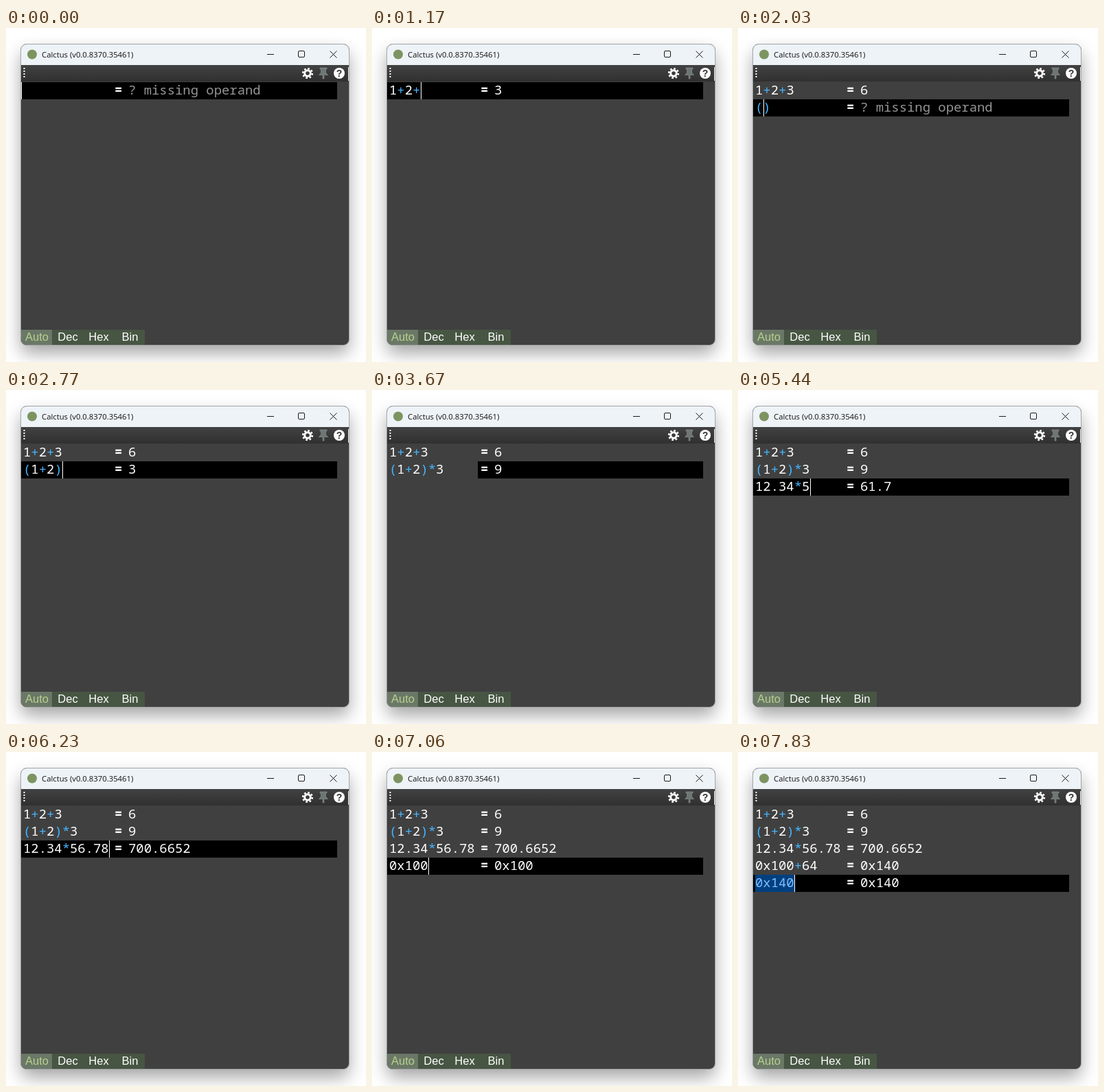
An HTML page that plays this animation: 524 px wide and 487 px high, repeating every 8 s.

```html
<!DOCTYPE html>
<html lang="en">
<head>
<meta charset="utf-8">
<title>Calctus</title>
<style>
  html, body { margin: 0; width: 100%; height: 100%; overflow: hidden; background: #fff; }
  svg { display: block; }
  text { white-space: pre; }
  .mono { font: 18.9px "Noto Sans Mono", monospace; fill: #fff; }
  .title { font: 11.3px "Open Sans", "Noto Sans", sans-serif; fill: #111; }
  .tab { font: 16.5px "Liberation Sans", sans-serif; fill: #fff; text-anchor: middle; }
  .op { fill: #45b4ff; }
  .err { fill: #959595; }
  .eq { font-weight: 700; }
</style>
</head>
<body>
<svg width="524" height="487" viewBox="0 0 524 487">
  <defs>
    <filter id="blur" x="-20%" y="-20%" width="140%" height="140%">
      <feGaussianBlur stdDeviation="13"/>
    </filter>
    <linearGradient id="bar" x2="0" y2="1">
      <stop stop-color="#424242"/><stop offset="1" stop-color="#303030"/>
    </linearGradient>
    <clipPath id="frame"><rect x="22" y="24" width="477" height="438" rx="8"/></clipPath>
    <clipPath id="sheet"><rect x="22" y="79" width="460" height="361"/></clipPath>
  </defs>

  <rect width="524" height="487" fill="#fff"/>
  <rect x="22" y="36" width="477" height="438" rx="8" opacity=".36" filter="url(#blur)"/>
  <rect x="21.5" y="23.5" width="478" height="439" rx="8.5" fill="#404040" stroke="#a4a6a8"/>

  <g clip-path="url(#frame)">
    <rect x="22" y="24" width="477" height="30" fill="#eef3f8"/>
    <rect x="22" y="54" width="477" height="24" fill="url(#bar)"/>
    <rect x="22" y="440" width="45" height="22" fill="#6b7867"/>
    <rect x="67" y="440" width="135" height="22" fill="#475643"/>
    <rect x="498" y="57" width="1" height="20" fill="#eee"/>
  </g>

  <circle cx="38" cy="38.5" r="7" fill="#7d9460"/>
  <text class="title" x="52" y="43">Calctus (v0.0.8370.35461)</text>
  <g fill="none" stroke="#1a1a1a">
    <path d="M380 38.5h10M471.5 33.5l10 10m0-10l-10 10"/>
    <rect x="425.5" y="33.5" width="9" height="9" rx="1.5"/>
  </g>

  <path d="M26.5 58v16" stroke="#fff" stroke-width="2" stroke-dasharray="2 2"/>
  <g fill="none" stroke="#fff">
    <circle cx="439" cy="66" r="4.3" stroke-width="3"/>
    <circle cx="439" cy="66" r="6.8" stroke-width="2.6" stroke-dasharray="2.67"/>
  </g>
  <path d="M457 58h10v2h-1.5v5l3 3.5h-5.5v5.5h-2v-5.5h-5.500l3-3.500v-5h-1.500z" fill="#6f7676" stroke="#8b9292" stroke-width=".6"/>
  <circle cx="485" cy="66" r="8" fill="#fff"/>
  <text x="485" y="71" text-anchor="middle" font-family="Liberation Sans, sans-serif" font-weight="700" font-size="14" fill="#333">?</text>

  <g class="tab">
    <text x="45" y="456" style="fill:#b5d28d">Auto</text>
    <text x="90" y="456">Dec</text>
    <text x="135" y="456">Hex</text>
    <text x="180.500" y="456">Bin</text>
  </g>
  <g id="lines" class="mono" clip-path="url(#sheet)"></g>
</svg>

<script>
const LOOP = 8000, ROW = 25, TOP = 79, LEFT = 25, ADVANCE = 11.34;
const NO_OPERAND = '? missing operand';
const BAD_CHAR = "? unexpected character: '.'";
const BAD_TOKEN = '? unexpected token: x';

// [time, line, input, answer]: "|" marks the caret, a leading "#" selects the input
const steps = [
  [0, 0, '|', NO_OPERAND],
  [270, 0, '1|', '1'],
  [500, 0, '1+|', '1'],
  [630, 0, '1+|', NO_OPERAND],
  [870, 0, '1+2|', '3'],
  [1130, 0, '1+2+|', '3'],
  [1270, 0, '1+2+|', NO_OPERAND],
  [1540, 0, '1+2+3|', '6'],
  [1740, 0, '1+2+3', '6'],
  [1770, 1, '#6|', '6'],
  [2000, 1, '(|)', '6'],
  [2030, 1, '(|)', NO_OPERAND],
  [2300, 1, '(1|)', '1'],
  [2470, 1, '(1+|)', '1'],
  [2500, 1, '(1+|)', NO_OPERAND],
  [2630, 1, '(1+2|)', '3'],
  [2770, 1, '(1+2)|', '3'],
  [3070, 1, '(1+2)*|', '3'],
  [3200, 1, '(1+2)*|', NO_OPERAND],
  [3470, 1, '(1+2)*3|', '9'],
  [3670, 1, '(1+2)*3', '9'],
  [3700, 2, '#9|', '9'],
  [3930, 2, '1|', '1'],
  [4170, 2, '12|', '12'],
  [4400, 2, '12.|', '12'],
  [4430, 2, '12.|', BAD_CHAR],
  [4640, 2, '12.3|', '12.3'],
  [4810, 2, '12.34|', '12.34'],
  [5010, 2, '12.34*|', NO_OPERAND],
  [5280, 2, '12.34*5|', '61.7'],
  [5450, 2, '12.34*56|', '691.04'],
  [5640, 2, '12.34*56.|', '691.04'],
  [5670, 2, '12.34*56.|', BAD_CHAR],
  [5830, 2, '12.34*56.7|', '699.678'],
  [6030, 2, '12.34*56.78|', '700.6652'],
  [6260, 2, '12.34*56.78', '700.6652'],
  [6260, 3, '#700.6652|', '700.6652'],
  [6520, 3, '0|', '0'],
  [6690, 3, '0x|', '0'],
  [6720, 3, '0x|', BAD_TOKEN],
  [6830, 3, '0x1|', '0x1'],
  [6930, 3, '0x10|', '0x10'],
  [7060, 3, '0x100|', '0x100'],
  [7160, 3, '0x100+|', '0x100'],
  [7190, 3, '0x100+|', NO_OPERAND],
  [7400, 3, '0x100+6|', '0x106'],
  [7630, 3, '0x100+64|', '0x140'],
  [7830, 3, '0x100+64', '0x140'],
  [7830, 4, '#0x140|', '0x140']
];

const rect = (x, y, w, h, fill) =>
  `<rect x="${x}" y="${y}" width="${w}" height="${h}" fill="${fill}"/>`;
const text = (x, y, body, cls = '') => `<text class="${cls}" x="${x}" y="${y}">${body}</text>`;
const caretX = n => n ? Math.round(LEFT + 0.5 + ADVANCE * n) : 22;

function drawLine([, line, input, answer], active) {
  const y = TOP + ROW * line, base = y + 18;
  const selected = input[0] === '#';
  const raw = selected ? input.slice(1) : input;
  const caret = raw.indexOf('|');
  const expr = raw.replace('|', '');
  const back = caret < 0 ? 154 : 22;
  let out = active ? rect(back, y, 482 - back, ROW, '#000') : '';
  out += text(LEFT, base, expr.replace(/[+*()]/g, '<tspan class="op">$&</tspan>'));
  out += text(158, base, '=', 'eq');
  out += text(178, base, answer, answer[0] === '?' ? 'err' : '');
  if (active && selected) out += rect(LEFT, y, caretX(caret) - LEFT, ROW, 'rgba(0,128,255,.5)');
  if (active && caret >= 0) out += rect(caretX(caret), y, 1, ROW, '#fff');
  return out;
}

const layer = document.getElementById('lines');
let shown = 0;

function render(t) {
  const past = steps.filter(s => s[0] <= t);
  if (past.length === shown) return;
  shown = past.length;
  const lines = [];
  for (const s of past) lines[s[1]] = s;
  layer.innerHTML = lines.map((s, i) => drawLine(s, i === lines.length - 1)).join('');
}

const start = performance.now();
function tick() {
  render((performance.now() - start) % LOOP);
  requestAnimationFrame(tick);
}
tick();
</script>
</body>
</html>
```
